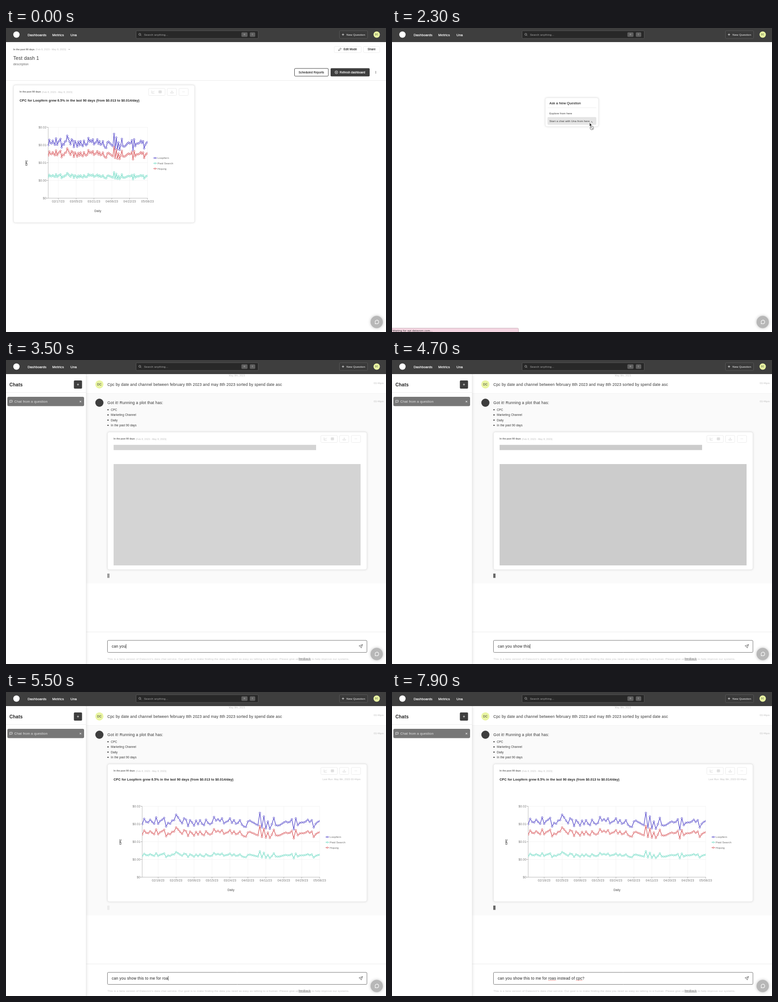
An HTML page with a canvas for the animation above (8 s loop, 837 by 669 pixels).

```html
<!DOCTYPE html>
<html lang="en">
<head>
<meta charset="utf-8">
<title>Dashboard to chat</title>
<style>
html, body { margin: 0; width: 100%; height: 100%; overflow: hidden; background: #fff; }
canvas { display: block; width: 837px; height: 669px; }
</style>
</head>
<body>
<canvas id="stage"></canvas>
<script>
const W = 837, H = 669, LOOP = 8000;
const canvas = document.getElementById('stage');
const ctx = canvas.getContext('2d');
const dpr = window.devicePixelRatio || 1;
canvas.width = W * dpr;
canvas.height = H * dpr;

const DARK = '#3e3e3e', INK = '#333', GREY = '#777', PALE = '#bbb';
const PROMPT = 'can you show this to me for roas instead of cpc?';
const SERIES = [
  { name: 'Loopfern', color: '#584ccc', mid: 34.5, gain: 1 },
  { name: 'Paid Search', color: '#72dcc6', mid: 107.5, gain: .42 },
  { name: 'Hopzig', color: '#da5a5e', mid: 58.5, gain: .75 }
];
// Daily offset from the series mean, in pixels, downwards.
const DAILY = [
  5, -7, 0, 1, -5, 0, 4, -10, 4, -2, -5, -9, 10, 2, 4, -3, -4, -16, -10, -3, 3, -8, -5, 9, -4, 1, 8, -3, 5, -4,
  4, 7, -5, 2, 5, 2, -11, -3, -6, -2, -8, 3, 0, -2, -8, 2, -4, 4, 2, -4, 6, 10, 11, -1, -3, 0, 2, 5, 7, -20,
  12, -12, 14, -1, 15, 5, -9, 7, 8, 7, 4, 1, -1, 1, 0, -6, 16, -8, 7, 2, 1, 1, -1, -5, 0, -4, 12, 4, 0, -2
];
// Keys are [time, value, ...].
const POINTER = [[100, 600, 7], [700, 391, 143], [900, 391, 143], [1100, 417.5, 160.5], [1400, 434, 208], [2400, 434.5, 208]];
const TYPING = [[2900, 0], [4150, 16], [4400, 17], [4800, 17], [5500, 31], [6600, 41], [7150, 48]];

function sample(keys, t) {
  const next = keys.findIndex(k => k[0] > t);
  if (next === 0) return keys[0].slice(1);
  if (next < 0) return keys[keys.length - 1].slice(1);
  const a = keys[next - 1], b = keys[next], p = (t - a[0]) / (b[0] - a[0]);
  return a.slice(1).map((v, i) => v + (b[i + 1] - v) * p);
}

function setFont(size, bold) {
  ctx.font = `${bold ? 'bold ' : ''}${size}px "Liberation Sans", Arial, sans-serif`;
  ctx.letterSpacing = size * .024 + 'px';
}

// y is the middle of the capitals.
function text(s, x, y, size, color = INK, style = '', align = 'left') {
  setFont(size, style === 'bold');
  ctx.textAlign = align;
  ctx.fillStyle = ctx.strokeStyle = color;
  ctx.fillText(s, x, y + size * .35);
  if (style === 'medium') {
    ctx.lineWidth = .22;
    ctx.strokeText(s, x, y + size * .35);
  }
}

function box(x, y, w, h, r, fill, stroke, shadow) {
  ctx.save();
  ctx.beginPath();
  ctx.roundRect(x, y, w, h, r);
  if (shadow) {
    ctx.shadowColor = 'rgba(0,0,0,.13)';
    ctx.shadowBlur = shadow * dpr;
  }
  if (fill) {
    ctx.fillStyle = fill;
    ctx.fill();
  }
  ctx.shadowColor = 'transparent';
  if (stroke) {
    ctx.strokeStyle = stroke;
    ctx.lineWidth = 1;
    ctx.stroke();
  }
  ctx.restore();
}

function line(x1, y1, x2, y2, color, width = 1) {
  ctx.beginPath();
  ctx.moveTo(x1, y1);
  ctx.lineTo(x2, y2);
  ctx.strokeStyle = color;
  ctx.lineWidth = width;
  ctx.stroke();
}

function disc(x, y, r, fill, stroke, width = 1) {
  ctx.beginPath();
  ctx.arc(x, y, r, 0, 7);
  if (fill) {
    ctx.fillStyle = fill;
    ctx.fill();
  }
  if (stroke) {
    ctx.strokeStyle = stroke;
    ctx.lineWidth = width;
    ctx.stroke();
  }
}

function icon(d, x, y, stroke, width = .8, fill) {
  const path = new Path2D(d);
  ctx.save();
  ctx.translate(x, y);
  ctx.lineJoin = 'round';
  if (fill) {
    ctx.fillStyle = fill;
    ctx.fill(path);
  }
  if (stroke) {
    ctx.strokeStyle = stroke;
    ctx.lineWidth = width;
    ctx.stroke(path);
  }
  ctx.restore();
}

function header() {
  box(0, 0, W, 31, 0, DARK);
  disc(23, 14.5, 7, '#fff');
  text('Dashboards', 47.5, 15, 7.4, '#fff', 'medium');
  text('Metrics', 102, 15, 7.6, '#fff', 'medium');
  text('Una', 142, 15, 7.4, '#fff', 'medium');
  box(286.5, 6, 269, 17, 2, '#282828', '#555');
  disc(294.7, 14, 2.2, null, '#bbb', .8);
  line(296.3, 15.6, 298, 17.3, '#bbb', .8);
  text('Search anything...', 304, 14.8, 6.25, '#aaa');
  box(518.5, 9.5, 13.5, 10, 2, '#5e5e5e');
  box(537, 9.5, 12, 10, 2, '#5e5e5e');
  text('⌘', 525.3, 14.5, 5, '#aaa', '', 'center');
  text('K', 543, 14.5, 4.5, '#aaa', '', 'center');
  box(734.5, 6, 62, 17, 2, '#3a3a3a', '#575757');
  icon('M-2.5 0H2.5M0-2.5V2.5', 742.3, 14.5, '#fff', .8);
  text('New Question', 750, 14.8, 6.25, '#fff');
  disc(816.5, 14.5, 7, '#e9f5a2');
  text('DC', 816.5, 14.5, 4.6, INK, '', 'center');
}

function dateRange(x, y) {
  text('In the past 90 days', x, y, 5, '#666', 'bold');
  text('(Feb 8, 2023 - May 8, 2023)', x + 49, y, 5.2, PALE);
}

function chart(x, y, w, firstTick, step, labels) {
  const gap = w / (DAILY.length - 1), h = 156;
  ['$0.02', '$0.01', '$0.01', '$0.00', '$0'].forEach((label, i) => {
    const ly = y + i * 39;
    line(x, ly, x + w, ly, '#efefef', .7);
    line(x - 3.5, ly, x, ly, '#999', .8);
    text(label, x - 4, ly + .5, 6.6, '#777', '', 'right');
  });
  labels.forEach((label, i) => {
    const lx = x + (firstTick + i * step) * gap;
    line(lx, y, lx, y + h, '#efefef', .7);
    line(lx, y + h, lx, y + h + 3, '#999', .8);
    text(label, lx, y + h + 7, 6.8, '#777', '', 'center');
  });
  line(x, y, x, y + h, '#aaa', .8);
  line(x, y + h, x + w, y + h, '#aaa', .8);
  text('Daily', x + w / 2, y + 184, 6.5, '#444', '', 'center');
  ctx.save();
  ctx.translate(x - 48, y + 78.5);
  ctx.rotate(-Math.PI / 2);
  text('CPC', 0, 0, 5.8, INK, 'medium', 'center');
  ctx.restore();

  SERIES.forEach(({ color, mid, gain }) => {
    const points = DAILY.map((v, i) => [x + i * gap, y + mid + v * gain]);
    ctx.beginPath();
    points.forEach(p => ctx.lineTo(...p));
    ctx.strokeStyle = color;
    ctx.lineWidth = 1.3;
    ctx.lineJoin = 'round';
    ctx.stroke();
    ctx.save();
    ctx.beginPath();
    ctx.rect(x, y, w, h);
    ctx.clip();
    points.forEach(p => disc(...p, 1.7, '#fff', color, 1));
    ctx.restore();
  });
  SERIES.forEach(({ name, color }, i) => {
    const lx = x + w + 13, ly = y + 67.6 + i * 11.7;
    line(lx, ly, lx + 7.5, ly, color, 1.1);
    disc(lx + 3.7, ly, 1.5, '#fff', color, 1);
    text(name, lx + 9, ly, 6.1, '#666');
  });
}

function card(x, y, w, active, menuOpen) {
  const right = x + w, ink = active ? '#555' : '#d2d2d2', edge = active ? '#ddd' : '#ececec';
  box(x, y, w, 303, 4, '#fff', '#e6e6e6', 5);
  dateRange(x + 13.5, y + 15.2);
  box(right - 101.5, y + 7.5, 36.5, 15.5, 2, '#fff', edge);
  box(right - 60.5, y + 7.5, 20.5, 15.5, 2, '#fff', edge);
  box(right - 34.5, y + 7.5, 20.5, 15.5, 2, menuOpen ? '#f7f7f7' : '#fff', menuOpen ? '#bbb' : edge);
  const cy = y + 15;
  icon('M-3-3V3H3M-2 1L0-1L1 0L3-2', right - 91.5, cy, ink, .8);
  icon('M-2.8-2.5H2.8V2.5H-2.8ZM-2.8-1H2.8M-2.8 .8H2.8M0-2.5V2.5', right - 76, cy, ink, .9);
  icon('M-3 .5V2.8H3V.5M0-3V1M-1.5-.5L0 1L1.5-.5', right - 50, cy, ink, .8);
  for (let i = -1; i < 2; i++) disc(right - 24.5 + i * 2, cy, .6, ink);
}

function headline(x, y) {
  text('CPC for Loopfern grew 6.5% in the last 90 days (from $0.013 to $0.014/day)', x, y, 7.1, '#222', 'bold');
}

function menu(t) {
  const loading = t >= 1700, right = loading ? 455 : 443.5;
  box(337.5, 153.5, right - 337.5, 63.5, 4, '#fff', '#e9e9e9', 5);
  text('Ask a New Question', 346.7, 165, 7.3, '#333', 'medium');
  line(343, 175.5, right - 5, 175.5, '#eee');
  if (t >= 1350) box(342.5, 196, right - 347.5, 17, 2, '#e5e5e5');
  text('Explore from here', 346.7, 188, 6, '#333');
  text('Start a chat with Una from here', 346.7, 204.7, 6.1, '#333');
  if (loading) {
    const a = (t - 2300) / 1000 * Math.PI * 2 + 1.6;
    ctx.beginPath();
    ctx.arc(442, 205, 2.8, a, a + 1.5);
    ctx.strokeStyle = '#555';
    ctx.lineWidth = .8;
    ctx.stroke();
  }
}

function dashboard(t) {
  dateRange(16, 47);
  icon('M-1.5-.8L0 .8L1.5-.8', 139.2, 47, '#777', .8);
  text('Test dash 1', 16, 66.5, 10.6, INK);
  text('description', 16, 79.5, 6.65, '#666');
  box(723, 40.5, 59.5, 13.5, 2, '#fff', '#eee');
  icon('M-3 3L-2.4 .8L1.4-3L3-1.4L-.8 2.4Z', 735.5, 47, '#444', .8);
  text('Edit Mode', 743.5, 47.2, 6.3, INK, 'medium');
  box(787.5, 40.5, 35.5, 13.5, 2, '#fff', '#eee');
  text('Share', 796.5, 47.2, 6.3, INK, 'medium');
  box(635.5, 89, 74.5, 17, 2, '#fff', '#444');
  text('Scheduled Reports', 644.5, 97.7, 6.3, INK, 'medium');
  box(715, 88.5, 86, 18, 2, DARK);
  disc(727.7, 97.5, 3.2, null, '#fff', .8);
  icon('M-1-1.5L1.5 0L-1 1.5Z', 727.7, 97.5, null, 0, '#fff');
  text('Refresh dashboard', 735, 97.7, 6.3, '#fff', 'medium');
  for (let i = -1; i < 2; i++) disc(814.5, 97.5 + i * 2, .7, '#444');
  line(0, 115.5, W, 115.5, '#ebebeb');

  card(16.5, 125.5, 399, t >= 600, t >= 700);
  headline(30, 159.7);
  chart(93, 218.5, 218.7, 9, 16, ['02/17/23', '03/05/23', '03/21/23', '04/06/23', '04/22/23', '05/08/23']);
}

function sidebar() {
  box(0, 31, 176.5, H - 31, 0, '#fff', null, 6);
  line(176.5, 31, 176.5, H, '#eaeaea');
  text('Chats', 7.5, 54, 10.2, '#222', 'bold');
  box(149.5, 45, 18, 18, 2, DARK);
  icon('M-2.3 0H2.3M0-2.3V2.3', 158.5, 54, '#fff', .8);
  line(0, 71.5, 176, 71.5, '#eee');
  box(3, 81, 169, 20.5, 3, '#777');
  icon('M-2.7 3V-2.5H2.7V1.5H-1.2Z', 11, 91.2, '#fff', .8);
  text('Chat from a question', 18.3, 91.7, 7.5, '#e6e6e6');
  icon('M-1.7-1.7L1.7 1.7M1.7-1.7L-1.7 1.7', 164, 91.5, '#fff', 1);
}

function squiggle(word) {
  const start = PROMPT.indexOf(word), x = 233 + ctx.measureText(PROMPT.slice(0, start)).width;
  ctx.save();
  ctx.setLineDash([1.3, .8]);
  line(x, 634.7, x + ctx.measureText(word).width, 634.7, '#e0504a', .9);
  ctx.restore();
}

function composer(t) {
  const count = Math.floor(sample(TYPING, t)[0] + .01), typed = PROMPT.slice(0, count);
  line(177, 598.5, W, 598.5, '#ebebeb');
  box(223.5, 617, 571.5, 26.5, 2, '#fff', '#777');
  text(typed || 'Ask a question...', 233, 630.3, 8.47, typed ? '#222' : '#999');
  if (count > 32) squiggle('roas');
  if (t >= 7400) squiggle('cpc');
  if (t < 7700) {
    const x = 233.3 + (typed ? ctx.measureText(typed).width : 0);
    line(x, 625, x, 635, '#222', .8);
  }
  icon('M4-4L1 4L-.8 .8L-4-1ZM4-4L-.8 .8', 781.5, 630, '#555', .8);
  const y = 657.5, tone = '#c4c4c4';
  text("This is a beta version of Datavorn's data chat service. Our goal is to make finding the data you need as easy as talking to a human. Please give us", 223.3, y, 6.18, tone);
  text('feedback', 644.5, y, 6.3, '#666');
  line(644.5, 660.7, 671.5, 660.7, '#666', .6);
  text('to help improve our systems.', 673.3, y, 6.18, tone);
}

function chat(t) {
  box(177, 73.5, W - 177, 418, 0, '#fafafa');
  line(177, 73.5, W, 73.5, '#f3f3f3');
  text('May 8th, 2023', 508.7, 34.3, 5.4, PALE, '', 'center');
  disc(205.7, 53.7, 9, '#e9f5a2');
  text('DC', 205.7, 54, 6.6, INK, '', 'center');
  text('Cpc by date and channel between february 8th 2023 and may 8th 2023 sorted by spend date asc', 223.3, 54, 8.53, INK);
  disc(205.7, 94, 9, DARK);
  text('Got it! Running a plot that has:', 223.3, 94.2, 8.6, INK);
  [51.5, 91.5].forEach(y => text('03:44pm', 832, y, 5.4, PALE, '', 'right'));
  ['CPC', 'Marketing Channel', 'Daily', 'In the past 90 days'].forEach((item, i) => {
    const y = 109.5 + i * 11.4;
    disc(224.7, y, 1.3, '#222');
    text(item, 231, y, 6.35, INK);
  });

  card(223.5, 158.5, 571.5, false);
  if (t < 5100) {
    const shade = Math.round(220 - 16 * Math.min(1, (t - 2400) / 2300));
    const fill = `rgb(${shade},${shade},${shade})`;
    box(237, 186.7, 446, 11.5, 0, fill);
    box(237, 229, 544, 223, 0, fill);
  } else {
    headline(237, 192.7);
    text('Last Run: May 8th, 2023 03:44pm', 781, 192.3, 5.3, PALE, '', 'right');
    chart(300, 251.5, 391, 8, 9, ['02/16/23', '02/25/23', '03/06/23', '03/15/23', '03/24/23',
      '04/02/23', '04/11/23', '04/20/23', '04/29/23', '05/08/23']);
  }
  const pulse = .5 + .5 * Math.cos((t - 4750) / 1600 * Math.PI * 2);
  box(223, 470, 5, 9.5, 0, `rgba(85,85,85,${.08 + .8 * pulse})`);
  composer(t);
  sidebar();
}

function statusBar() {
  box(-2, 660.5, 280.5, 12, 2, '#f5d6e2', '#c9b3bc');
  text('Waiting for api.datavorn.com...', 1, 666.3, 6.2, '#333');
}

function pointer(t) {
  const [x, y] = sample(POINTER, t);
  icon('M0 0V8.5L2-.0L0 0ZM0 0V8.6L2 6.8L3.4 9.8L4.9 9.1L3.5 6.2H6.2Z', x, y, '#fff', .7, '#000');
  if (t >= 1700 && t < 2400) {
    disc(x + 5.7, y + 12, 3.9, '#eee', '#888', 1.1);
    line(x + 3, y + 9.3, x + 8.4, y + 14.7, '#888', 1.1);
  }
}

function helpBubble() {
  ctx.save();
  ctx.shadowColor = 'rgba(0,0,0,.25)';
  ctx.shadowBlur = 6 * dpr;
  disc(816.5, 647, 13.5, '#b7b7b7');
  ctx.restore();
  icon('M-3.8 4L-3.3 1.8A4 4 0 1 1-1.5 3.5Z', 816.8, 647, '#fff', 1.1);
}

function draw(now) {
  const t = now % LOOP;
  ctx.setTransform(dpr, 0, 0, dpr, 0, 0);
  box(0, 0, W, H, 0, '#fff');
  if (t >= 2400) chat(t);
  else if (t < 2300) dashboard(t);
  header();
  if (t >= 800 && t < 2400) menu(t);
  helpBubble();
  if (t >= 1800 && t < 2700) statusBar();
  if (t >= 100 && t < 2900) pointer(t);
  requestAnimationFrame(draw);
}
requestAnimationFrame(draw);
</script>
</body>
</html>
```
